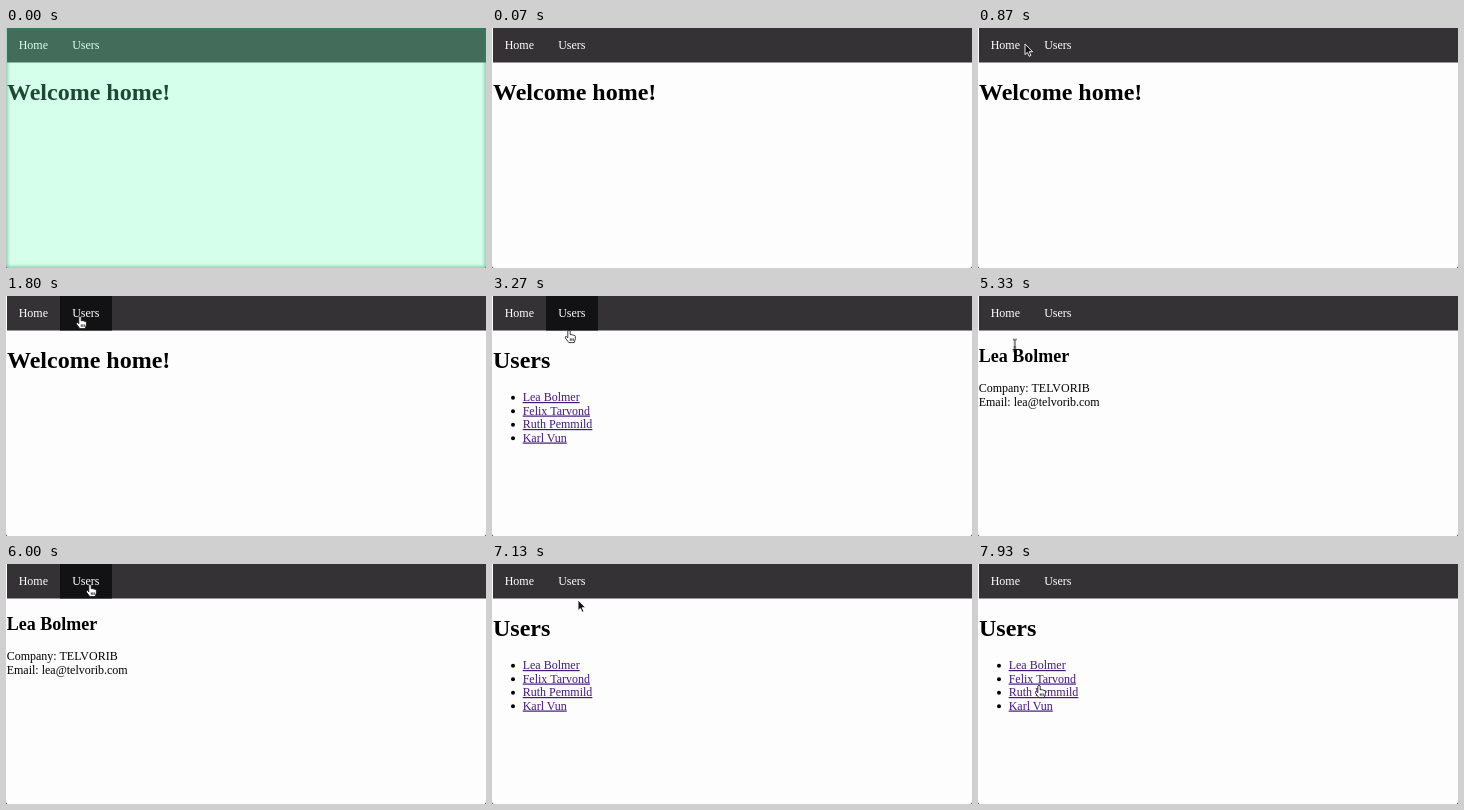
An HTML page that plays this animation: 480x240 px, repeating every 8000 ms.

```html
<!DOCTYPE html>
<html lang="en">
<head>
<meta charset="utf-8">
<title>Users page walkthrough</title>
<style>
  html, body { margin: 0; width: 100%; height: 100%; overflow: hidden; background: #fefdfe; }
  svg { display: block; width: 100%; height: 100%; font: 12px "Liberation Serif", Times, serif; }
  h1, .h1 { font-size: 24px; font-weight: bold; }
  .h2 { font-size: 18px; font-weight: bold; }
  .link { fill: #45197a; text-decoration: underline; }

  .timed { visibility: hidden; animation: 8s step-end infinite; }
  .flash { animation-name: flash; }
  .home { animation-name: home; }
  .list { animation-name: list; }
  .detail { animation-name: detail; }
  .hover-home { animation-name: hover-home; }
  .hover-users { animation-name: hover-users; }
  .arrow { animation-name: arrow; }
  .hand { animation-name: hand; }
  .beam { animation-name: beam; }
  .cursor { animation: travel 8s ease-in-out infinite; }

  @keyframes flash { 0% { visibility: visible } .875%, 100% { visibility: hidden } }

  /* pages */
  @keyframes home { 0% { visibility: visible } 30.875%, 100% { visibility: hidden } }
  @keyframes list {
    0%, 52.5% { visibility: hidden }
    30.875%, 81.625%, 100% { visibility: visible }
  }
  @keyframes detail { 0%, 81.625%, 100% { visibility: hidden } 52.5% { visibility: visible } }

  /* menu highlights */
  @keyframes hover-home { 0%, 20.5%, 100% { visibility: hidden } 18.375% { visibility: visible } }
  @keyframes hover-users {
    0%, 41.625%, 89.125%, 100% { visibility: hidden }
    20.5%, 71.625% { visibility: visible }
  }

  /* pointer shapes */
  @keyframes arrow {
    0%, 18.375%, 45.5%, 71.625%, 94%, 100% { visibility: hidden }
    4.125%, 41.625%, 67.5%, 89.125% { visibility: visible }
  }
  @keyframes hand {
    0%, 41.625%, 52.5%, 89.125% { visibility: hidden }
    18.375%, 45.5%, 71.625%, 94%, 100% { visibility: visible }
  }
  @keyframes beam { 0%, 67.5%, 100% { visibility: hidden } 52.5% { visibility: visible } }

  @keyframes travel {
    0%, 4.125% { transform: translate(201px, 219px) }
    10%, 10.9% { transform: translate(47px, 16px) }
    12.5% { transform: translate(35px, 15px) }
    14.125% { transform: translate(46px, 18px) }
    16.625%, 17.5% { transform: translate(18px, 38px) }
    18.375% { transform: translate(22px, 26px) }
    20.5% { transform: translate(56px, 20px) }
    22.5%, 30.875% { transform: translate(74px, 20px) }
    40.875% { transform: translate(77px, 34px) }
    41.625% { transform: translate(77px, 37px) }
    46.25% { transform: translate(36px, 104px) }
    49% { transform: translate(50px, 125px) }
    51.625%, 60.875% { transform: translate(70px, 98px) }
    64.4% { transform: translate(20px, 72px) }
    67.5% { transform: translate(40px, 45px) }
    70.875% { transform: translate(86px, 42px) }
    72.5% { transform: translate(84px, 25px) }
    75%, 81.625% { transform: translate(84px, 20px) }
    87.5% { transform: translate(86px, 30px) }
    89.125% { transform: translate(86px, 36px) }
    91.625% { transform: translate(86px, 60px) }
    94.4% { transform: translate(55px, 104px) }
    96.25% { transform: translate(36px, 117px) }
    97.5% { transform: translate(46px, 129px) }
    99.125%, 100% { transform: translate(61px, 121px) }
  }
</style>
</head>
<body>
<svg viewBox="0 0 480 240">
  <defs>
    <filter id="soft"><feGaussianBlur stdDeviation="1.5"/></filter>
  </defs>
  <rect width="480" height="240" fill="#fefdfe"/>

  <rect x="1" width="479" height="34.5" fill="#343235"/>
  <rect class="timed hover-home" x="1" width="53" height="34.5" fill="#121113"/>
  <rect class="timed hover-users" x="54" width="52" height="34.5" fill="#121113"/>
  <g fill="#fff">
    <text x="12.7" y="21">Home</text>
    <text x="66.2" y="21">Users</text>
  </g>

  <g class="timed home">
    <text class="h1" x="1" y="72">Welcome home!</text>
  </g>

  <g class="timed list">
    <text class="h1" x="1" y="72">Users</text>
    <g>
      <circle cx="21" cy="101.7" r="2"/>
      <circle cx="21" cy="115.2" r="2"/>
      <circle cx="21" cy="128.7" r="2"/>
      <circle cx="21" cy="142.2" r="2"/>
    </g>
    <text class="link" x="30.7" y="105">Lea Bolmer</text>
    <text class="link" x="30.7" y="118.5">Felix Tarvond</text>
    <text class="link" x="30.7" y="132">Ruth Pemmild</text>
    <text class="link" x="30.7" y="145.5">Karl Vun</text>
  </g>

  <g class="timed detail">
    <text class="h2" x=".7" y="66">Lea Bolmer</text>
    <text x=".7" y="96">Company: TELVORIB</text>
    <text x=".7" y="109.5">Email: lea@telvorib.com</text>
  </g>

  <path d="M0 238.5V240H1.5ZM480 238.5V240H478.5Z" fill="#555"/>

  <g class="timed flash">
    <rect width="480" height="240" fill="#6affb8" fill-opacity=".283"/>
    <rect width="480" height="240" fill="none" stroke="#2c8a62" stroke-opacity=".5" stroke-width="3" filter="url(#soft)"/>
  </g>

  <g class="cursor" stroke-linejoin="round">
    <path class="timed arrow" d="M0 0V10.6L2.4 8.4 4.1 12.3 5.9 11.5 4.2 7.7H7.6Z" fill="#111" stroke="#fff" stroke-width=".9"/>
    <path class="timed hand" d="M-1.2 1Q0-.5 1.2 1V4.8Q2.2 4 3 5 4 4.3 4.8 5.4 6.2 5 6.4 6.6V8.8L5.2 12.6H-.2L-3.6 8Q-4 6.2-2.6 6.4L-1.2 7.8ZM1.3 8.4V10.8M2.8 8.4V10.8M4.3 8.4V10.8" fill="#fff" stroke="#111" stroke-width=".8"/>
    <path class="timed beam" d="M-2-6Q0-6 0-5Q0-6 2-6M0-5V5M-2 6Q0 6 0 5Q0 6 2 6M-1.3 1.8H1.3" fill="none" stroke="#111" stroke-width="1"/>
  </g>
</svg>
</body>
</html>
```
